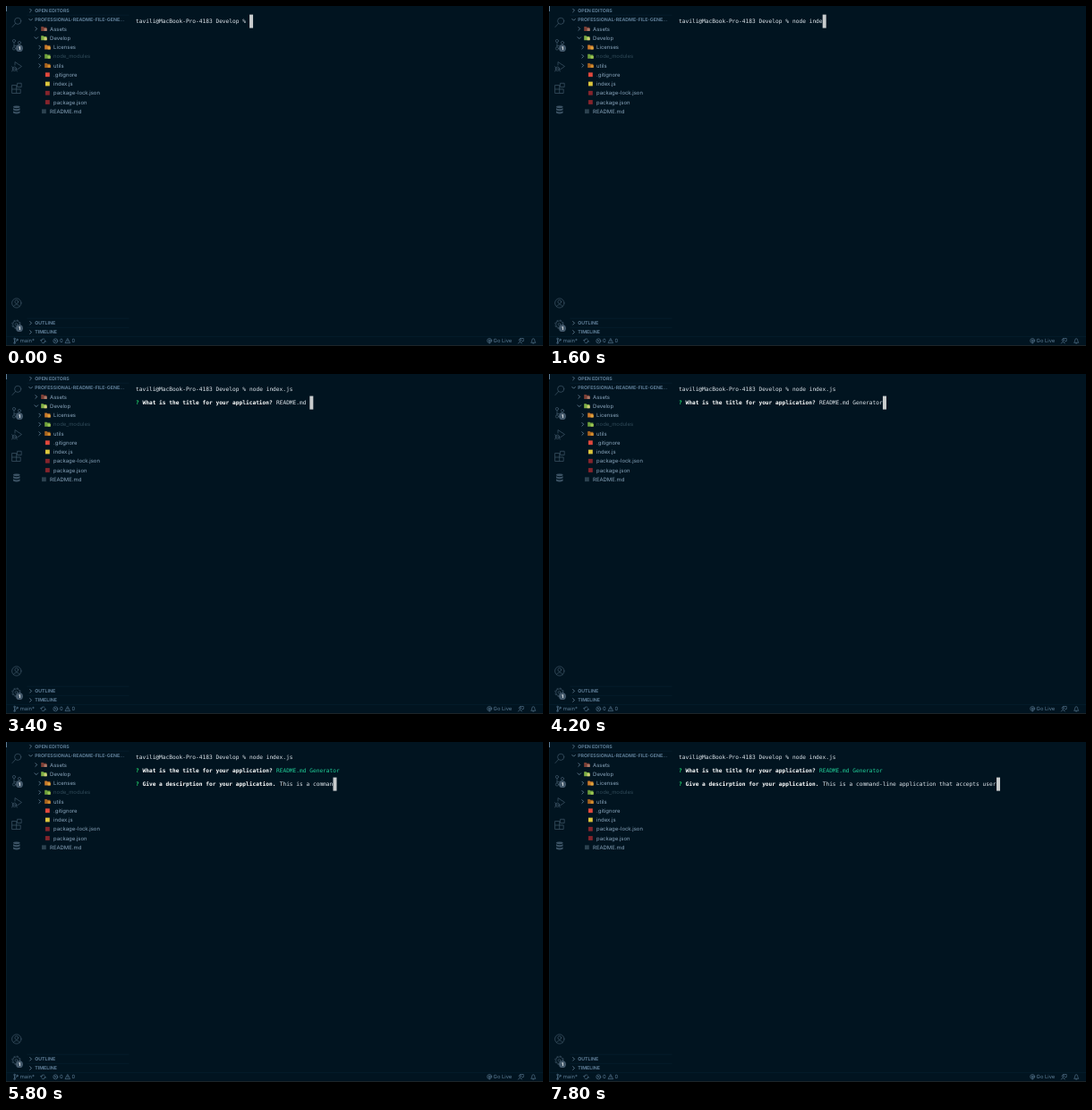
Animation of 600 by 380 pixels, one loop 8000 ms. Source, as an HTML page:

```html
<!DOCTYPE html>
<html lang="en">
<head>
<meta charset="utf-8">
<title>Terminal session</title>
<style>
  html, body { margin: 0; width: 100%; height: 100%; overflow: hidden; background: #011420; }
  svg { display: block; width: 100vw; height: 100vh; }
  text { white-space: pre; text-rendering: geometricPrecision; font-family: Inter, Roboto, sans-serif; }
  .head { font-size: 5.25px; font-weight: 700; fill: #5f7e97; }
  .item { font-size: 5.95px; fill: #89a4bb; }
  .status { font-size: 5.8px; fill: #5f7e97; }
  .badge { font-size: 5px; font-weight: 700; fill: #fff; text-anchor: middle; }
  .term text { font-family: "DejaVu Sans Mono", monospace; font-size: 6.207px; fill: #e2e8ee; }
  .term .ask { font-weight: 700; fill: #fff; }
  .term .mark { font-weight: 700; fill: #22da6e; }
  .line { fill: none; stroke-width: .75; stroke-linecap: round; stroke-linejoin: round; }
</style>
</head>
<body>
<svg viewBox="0 0 600 380">
  <rect width="600" height="380" fill="#011420"/>
  <rect width=".7" height="380" fill="#0c222f"/>
  <rect width="1" height="6" fill="#5f7e97"/>
  <path d="M24 10.2H137M24 349.2H137M24 359.4H137M0 369.6H600" class="line" stroke="#082331" style="stroke-width:.6"/>
  <rect y="379.3" width="600" height=".7" fill="#2a2d2d"/>

  <!-- activity bar -->
  <g class="line" stroke="#3c5365">
    <circle cx="13.2" cy="16.8" r="3.6"/>
    <path d="M10.6 19.5L7 23.5"/>
    <circle cx="9" cy="39" r="1.6"/><circle cx="15" cy="41" r="1.6"/><circle cx="9" cy="47.5" r="1.6"/>
    <path d="M9 40.6V45.9M15 42.6Q14.5 44.5 9 44.5"/>
    <path d="M10 66V62.5L17.5 67.5L12.5 71"/>
    <circle cx="9.5" cy="70.3" r="2.2"/>
    <path d="M7.3 70.3H11.7M6.5 67.8L8 69M6.3 73L7.8 71.8M12.6 73L11.2 71.8"/>
    <path d="M7 88.5H11.7V97.5H7ZM7 93H16.2V97.5H11.7M13 86.3H17.2V90.6H13Z"/>
    <circle cx="11.8" cy="332" r="5.2"/>
    <circle cx="11.8" cy="330.6" r="1.9"/>
    <path d="M8.3 335.7Q11.8 331.2 15.3 335.7"/>
    <circle cx="11.5" cy="355.8" r="3.9"/>
    <circle cx="11.5" cy="355.8" r="1.4"/>
    <circle cx="11.5" cy="355.8" r="4.8" stroke-dasharray="1.9 1.87" stroke-linecap="butt"/>
  </g>
  <g fill="#3c5365">
    <ellipse cx="11.8" cy="112.8" rx="3.8" ry="1.4"/>
    <path id="disk" d="M8 114.2Q11.8 116.2 15.6 114.2V116.3Q11.8 118.1 8 116.3Z"/>
    <path d="M8 117.4Q11.8 119.4 15.6 117.4V119.5Q11.8 121.3 8 119.5Z"/>
  </g>
  <g fill="#44596b"><circle cx="15" cy="47.2" r="3.9"/><circle cx="15" cy="360.2" r="3.9"/></g>
  <text class="badge" x="15" y="49">1</text>
  <text class="badge" x="15" y="362">1</text>

  <g id="tree"></g>

  <!-- status bar -->
  <g class="line" stroke="#5f7e97" style="stroke-width:.6">
    <circle cx="9.5" cy="372" r=".8"/><circle cx="9.5" cy="376.6" r=".8"/><circle cx="12.5" cy="373" r=".8"/>
    <path d="M9.5 372.8V375.8M12.5 373.8Q12.3 375 9.5 375"/>
    <path d="M39.3 374A2.3 2.3 0 0 1 43.5 373M43.9 374.6A2.3 2.3 0 0 1 39.7 375.6M38.5 373.4L39.3 374.3L40.3 373.5M42.9 375L43.9 374.2L44.7 375.1"/>
    <circle cx="55.3" cy="374.3" r="2.5"/>
    <path d="M54.3 373.3L56.3 375.3M56.3 373.3L54.3 375.3"/>
    <path d="M69 371.8L71.6 376.6H66.4ZM69 373.4V375"/>
    <circle cx="540.2" cy="374" r="2.5"/><circle cx="540.2" cy="374" r="1"/>
    <path d="M540.2 375V377.2"/>
    <circle cx="574.3" cy="373.3" r="1.1"/>
    <path d="M572.4 377Q574.3 373.6 576.2 377M574.5 371.5H578.2V374.5H577L576.2 375.5"/>
    <path d="M586.9 376Q587.7 375 587.7 373.5Q587.8 371.8 589.2 371.7Q590.6 371.8 590.7 373.5Q590.7 375 591.5 376ZM588.7 377H589.7"/>
  </g>
  <g class="status">
    <text x="15.8" y="376.3">main*</text>
    <text x="60" y="376.3">0</text>
    <text x="73.6" y="376.3">0</text>
    <text x="544.6" y="376.3">Go Live</text>
  </g>

  <g id="term" class="term"></g>
</svg>
<script>
const NS = "http://www.w3.org/2000/svg";
const tree = document.getElementById("tree");
const term = document.getElementById("term");

function add(parent, tag, attrs, content = "") {
  const el = document.createElementNS(NS, tag);
  for (const key in attrs) el.setAttribute(key, attrs[key]);
  el.textContent = content;
  return parent.appendChild(el);
}

// sidebar
function chevron(x, y, open) {
  const d = open ? `M${x - 1.8} ${y - .9}l1.8 1.8l1.8 -1.8` : `M${x - .9} ${y - 1.8}l1.8 1.8l-1.8 1.8`;
  add(tree, "path", { d, class: "line", stroke: "#7290a6" });
}

function header(label, y, open) {
  chevron(27.6, y, open);
  add(tree, "text", { x: 32.2, y: y + 1.9, class: "head" }, label);
}

function folder(x, y, color, accent) {
  add(tree, "path", { d: `M${x - 3.2} ${y - 2.5}h2.4l.8 .8h3v4.2h-6.2z`, fill: color });
  add(tree, "rect", { x: x + .2, y: y - .4, width: 3.2, height: 2.9, rx: .5, fill: accent });
}

function square(x, y, color, size) {
  add(tree, "rect", { x: x - size / 2, y: y - size / 2, width: size, height: size, fill: color });
}

header("OPEN EDITORS", 5, false);
header("PROFESSIONAL-README-FILE-GENE...", 15.3, true);
header("OUTLINE", 354.3, false);
header("TIMELINE", 364.5, false);

// label, depth, icon colour, folder accent, open
const rows = [
  ["Assets", 0, "#7d3f35", "#a8796a"],
  ["Develop", 0, "#7fae45", "#d3cf7a", true],
  ["Licenses", 1, "#c9792b", "#e0a33c"],
  ["node_modules", 1, "#6fa03c", "#9cc553"],
  ["utils", 1, "#a8641f", "#d08c2e"],
  [".gitignore", 1, "#e0483c"],
  ["index.js", 1, "#dcc63c"],
  ["package-lock.json", 1, "#85242c"],
  ["package.json", 1, "#85242c"],
  ["README.md", 0, "#2c4250"]
];
rows.forEach(([label, depth, color, accent, open], i) => {
  const y = 25.5 + i * 10.25, x = 42.4 + depth * 4;
  if (accent) {
    chevron(x - 8.6, y, open);
    folder(x, y, color, accent);
  } else square(x, y, color, 4.8);
  const text = add(tree, "text", { x: x + 6.7, y: y + 2.2, class: "item" }, label);
  if (label === "node_modules") text.style.fill = "#304a58";
});

// terminal
const LEFT = 145, CELL = 3.737, LINE = 15, STEP = 200, LOOP = 8000;
const prompt = "tavili@MacBook-Pro-4183 Develop % ";
const ask1 = "What is the title for your application? ";
const ask2 = "Give a descirption for your application. ";

// typed letters per step, from step "from" on
const typing = {
  command: { from: 0, text: "node index.js", counts: [0, 1, 2, 3, 4, 5, 6, 8, 9, 11, 13] },
  title: { from: 13, text: "README.md Generator", counts: [3, 5, 6, 8, 10, 12, 15, 17, 19] },
  about: {
    from: 22, text: "This is a command-line application that accepts user",
    counts: [0, 2, 4, 7, 9, 11, 13, 16, 18, 21, 24, 28, 33, 38, 42, 45, 48, 52]
  }
};

const cell = (row, col, cls = "", content = "") =>
  add(term, "text", { x: LEFT + col * CELL, y: 19.2 + row * LINE, class: cls }, content);

function question(row, label) {
  return [cell(row, 0, "mark", "?"), cell(row, 2, "ask", label)];
}

cell(0, 0, "", prompt);
const command = cell(0, prompt.length);
const first = question(1, ask1);
const title = cell(1, 2 + ask1.length);
const second = question(2, ask2);
const about = cell(2, 2 + ask2.length);
const caret = add(term, "rect", { width: 4, height: LINE, fill: "#c9cccd" });

function typed({ from, text, counts }, step) {
  if (step < from) return "";
  return text.slice(0, counts[Math.min(step - from, counts.length - 1)]);
}

const show = (els, on) => els.forEach(el => el.setAttribute("visibility", on ? "visible" : "hidden"));

function draw(time) {
  const step = Math.floor(time % LOOP / STEP);
  const asked = step >= typing.title.from, answered = step >= typing.about.from;
  command.textContent = typed(typing.command, step);
  title.textContent = typed(typing.title, step);
  about.textContent = typed(typing.about, step);
  title.style.fill = answered ? "#21d19a" : "";
  show(first, asked);
  show(second, answered);

  let row = 0, col = prompt.length + command.textContent.length;
  if (answered) [row, col] = [2, 2 + ask2.length + about.textContent.length];
  else if (asked) [row, col] = [1, 2 + ask1.length + title.textContent.length];
  else if (step >= typing.command.counts.length) [row, col] = [1, 0];
  caret.setAttribute("x", LEFT + col * CELL);
  caret.setAttribute("y", 9.6 + row * LINE);
}

const start = performance.now();
function tick() {
  draw(performance.now() - start);
  requestAnimationFrame(tick);
}
tick();
</script>
</body>
</html>
```
